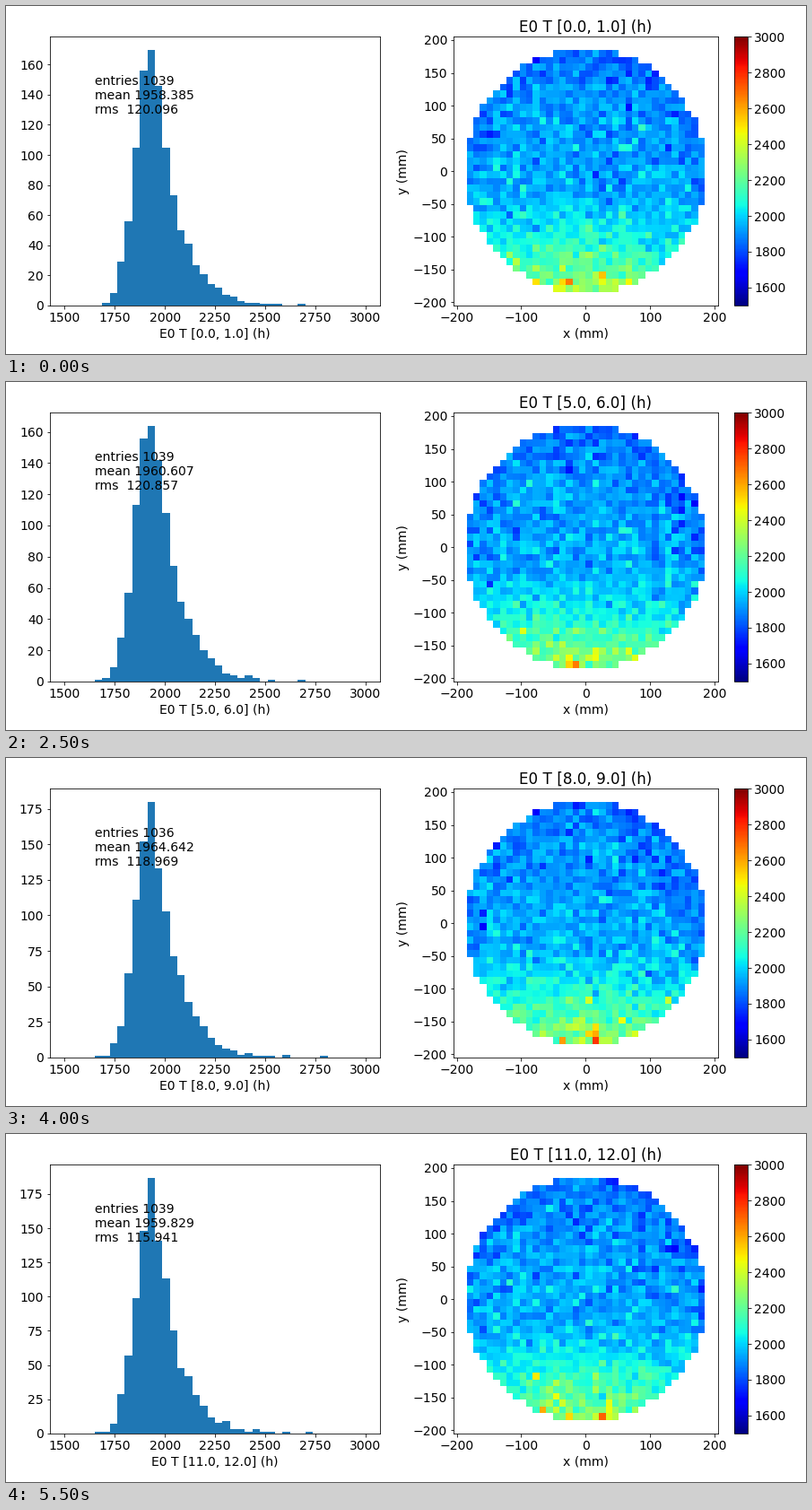
A matplotlib script that plays this animation: 892x388 px, repeating every 6000 ms.

```python
import numpy as np
import matplotlib.pyplot as plt
from matplotlib.animation import FuncAnimation

W, H, DPI = 892, 388, 72
HOURS, BINS, GRID = 12, 40, 40
LOW, HIGH, HALF = 1500, 3000, 205
EDGES, BIN = np.linspace(LOW, HIGH, BINS + 1, retstep=True)
PEAK_BIN = 11
plt.rcParams.update({"font.family": "DejaVu Sans", "font.size": 14})

# Key readings; hours in between are interpolated
KEY_HOURS = [0, 1, 3, 5, 7, 9, 11]
ENTRIES = [1039, 1037, 1038, 1039, 1038, 1035, 1039]
MEAN = [1958.385, 1961.847, 1963.419, 1960.607, 1969.511, 1959.773, 1959.829]
RMS = [120.096, 120.183, 123.092, 120.857, 121.303, 116.634, 115.941]
PEAK = [170, 158, 179, 164, 171, 189, 187]

# Disc of cells, outermost last
centres = np.arange(GRID) - (GRID - 1) / 2
gx, gy = (g.ravel() for g in np.meshgrid(centres, centres))
r2 = gx**2 + gy**2
disc = np.argsort(r2 - 0.01 * gy, kind="stable")[:np.count_nonzero(r2 < 332)]


def reading(values, hour):
    return np.interp(hour, KEY_HOURS, values)


def bin_counts(entries, peak, rng):
    """Gaussian rise, near-exponential fall, fixed peak and total."""
    d = np.arange(BINS) - PEAK_BIN + 0.1
    shape = np.where(d < 0, np.exp(-d**2 / 8),
                     np.exp(-0.35 * (np.hypot(d, 1) - 1)))
    expected = shape / shape.sum() * entries
    noisy = expected + 0.5 * np.sqrt(expected) * rng.normal(size=BINS)
    noisy = np.clip(noisy, 0, 0.96 * peak)
    noisy[PEAK_BIN] = 0
    noisy *= (entries - peak) / noisy.sum()
    noisy[PEAK_BIN] = peak
    return np.diff(np.rint(np.cumsum(noisy)), prepend=0).astype(int)


def heat_score(cells, rng):
    """Warm lower part, cool upper rim, plus cell noise."""
    x, y = (2 * HALF / GRID * g[cells] for g in (gx, gy))
    warm = np.clip((-y - 30) / 150, 0, 1) ** 1.2
    rim = (np.hypot(x, y) / 185) ** 6 * np.clip((y + 110) / 150, 0, 1)
    return (300 * warm * np.exp(-(x / 230) ** 2) - 0.17 * y - 0.08 * x
            - 65 * rim + rng.normal(0, 58, len(cells)))


def hour_data(hour):
    rng = np.random.default_rng(40 + hour)
    entries = round(reading(ENTRIES, hour))
    counts = bin_counts(entries, round(reading(PEAK, hour)), rng)
    values = np.sort(np.repeat(EDGES[:-1], counts) + rng.uniform(0, BIN, entries))
    cells = disc[:entries]
    field = np.full(GRID * GRID, np.nan)
    field[cells[np.argsort(heat_score(cells, rng))]] = values
    return counts, np.ma.masked_invalid(field.reshape(GRID, GRID))


data = [hour_data(h) for h in range(HOURS)]

fig, (hist_ax, map_ax) = plt.subplots(1, 2, figsize=(W / DPI, H / DPI), dpi=DPI)

bars = hist_ax.bar(EDGES[:-1], data[0][0], BIN, align="edge", color="#1f77b4")
hist_ax.set_xlim(LOW - 75, HIGH + 75)
hist_ax.set_xticks(range(LOW, HIGH + 1, 250))
stats = hist_ax.text(1650, 0.75 / 1.05, "",
                     transform=hist_ax.get_xaxis_transform())

edges_mm = np.linspace(-HALF, HALF, GRID + 1)
mesh = map_ax.pcolormesh(edges_mm, edges_mm, data[0][1],
                         cmap="jet", vmin=LOW, vmax=HIGH)
fig.colorbar(mesh, ax=map_ax, ticks=range(1600, 3001, 200))
map_ax.set(xlim=(-HALF, HALF), ylim=(-HALF, HALF),
           xlabel="x (mm)", ylabel="y (mm)",
           xticks=range(-200, 201, 100), yticks=range(-200, 201, 50))


def update(hour):
    counts, field = data[hour]
    for bar, count in zip(bars, counts):
        bar.set_height(count)
    hist_ax.set_ylim(0, counts.max() * 1.05)
    stats.set_text(f"entries {counts.sum()}\n"
                   f"mean {reading(MEAN, hour):.3f}\n"
                   f"rms  {reading(RMS, hour):.3f}")
    label = f"E0 T [{hour:.1f}, {hour + 1:.1f}] (h)"
    hist_ax.set_xlabel(label)
    map_ax.set_title(label)
    mesh.set_array(field)
    return [*bars, stats, mesh]


update(0)
# The layout reaches a fraction of a pixel past the right and top edges
fig.tight_layout(rect=(0, 0, (W + 0.8) / W, (H + 0.8) / H))

anim = FuncAnimation(fig, update, frames=HOURS, interval=500, repeat=True)
plt.show()
```
